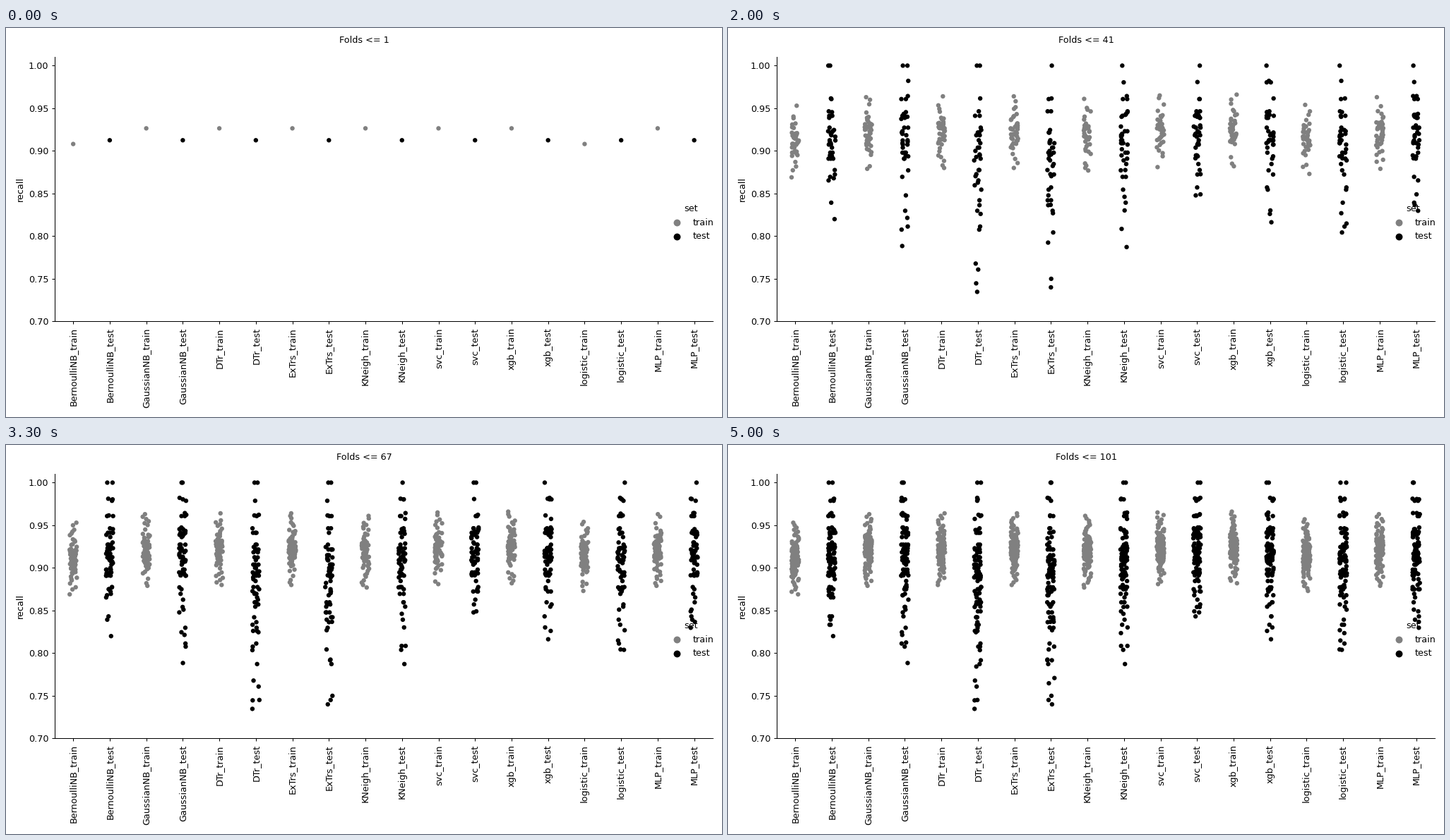
A matplotlib script that plays this animation: 1014 px wide and 552 px high, repeating every 5.1 s.

```python
import numpy as np
import matplotlib.pyplot as plt
from matplotlib.animation import FuncAnimation

WIDTH, HEIGHT, DPI = 1014, 552, 92
FRAMES, INTERVAL = 51, 100
FOLDS = 2 * FRAMES - 1
COLORS = {"train": "#808080", "test": "#000000"}

# Typical train score, typical test score and worst test score of each model.
MODELS = {
    "BernoulliNB": (.911, .911, .827),
    "GaussianNB": (.921, .916, .796),
    "DTr": (.922, .889, .732),
    "ExTrs": (.922, .890, .732),
    "KNeigh": (.919, .908, .796),
    "svc": (.923, .920, .837),
    "xgb": (.924, .918, .818),
    "logistic": (.915, .909, .796),
    "MLP": (.921, .920, .827),
}
TRAIN_RANGE = 0.042
FIRST_TEST = 0.9125
BEST_FOLD = 24
GOLDEN = (5 ** 0.5 - 1) / 2


def snap(score, size):
    """Nearest recall that a fold with `size` positives can give."""
    return 1 - np.round((1 - score) * size) / size


def fold_ranks(rng):
    """Rank of every fold from 0 (worst) to 1 (best), mostly shared by the models."""
    ease = (np.arange(FOLDS) - BEST_FOLD) * GOLDEN % 1 + rng.normal(0, 0.07, FOLDS)
    ease[BEST_FOLD] = 2
    ease[rng.integers(8, 33)] -= 2
    return ease.argsort().argsort() / (FOLDS - 1)


def spread(ranks, low, centre, high):
    """Dense around the centre, with thin tails out to both ends."""
    w = 2 * ranks - 1
    reach = 0.45 * np.abs(w) + 0.55 * w ** 6
    return centre + reach * np.where(w < 0, low - centre, high - centre)


def build_scores():
    rng = np.random.default_rng(7)
    sizes = rng.integers(46, 58, FOLDS)
    rows = []
    for train_mid, test_mid, worst in MODELS.values():
        train = spread(fold_ranks(rng), train_mid - TRAIN_RANGE, train_mid, train_mid + TRAIN_RANGE)
        train[0] = snap(train_mid, 54.4)
        test = snap(spread(fold_ranks(rng), worst, test_mid, 1), sizes)
        test[0] = FIRST_TEST
        rows += [train, test]
    return np.array(rows)


scores = build_scores()
labels = [f"{name}_{part}" for name in MODELS for part in COLORS]
columns = np.arange(len(labels))
column_colors = np.array(list(COLORS.values()) * len(MODELS))

# The small margin keeps the pixel size from rounding down.
fig = plt.figure(figsize=((WIDTH + 1e-6) / DPI, (HEIGHT + 1e-6) / DPI), dpi=DPI, facecolor="white")
plt.rcParams.update({"font.family": "DejaVu Sans", "font.size": 10})
ax = fig.add_axes([69.3 / WIDTH, 135.6 / HEIGHT, 931.2 / WIDTH, 375.1 / HEIGHT])
ax.set(xlim=(-0.5, len(labels) - 0.5), ylim=(0.7, 1.01), ylabel="recall")
ax.set_xticks(columns, labels, rotation=90)
ax.spines[["top", "right"]].set_visible(False)

dots = ax.scatter([], [], s=25, linewidths=0, zorder=3, clip_on=False)
keys = [ax.scatter([], [], s=60, linewidths=0, color=color) for color in COLORS.values()]
fig.legend(keys, list(COLORS), title="set", loc="center right", frameon=False, scatterpoints=1)
title = fig.suptitle("", fontsize=10)


def draw(frame):
    count = 2 * frame + 1
    jitter = np.random.default_rng(frame).uniform(-0.1, 0.1, (len(labels), count))
    if count == 1:
        jitter *= 0  # a lone dot stays centred
    x = columns[:, None] + jitter
    dots.set_offsets(np.column_stack([x.ravel(), scores[:, :count].ravel()]))
    dots.set_facecolors(np.repeat(column_colors, count))
    title.set_text(f"Folds <= {count}")
    return dots, title


animation = FuncAnimation(fig, draw, frames=FRAMES, interval=INTERVAL, repeat=True)
plt.show()
```
